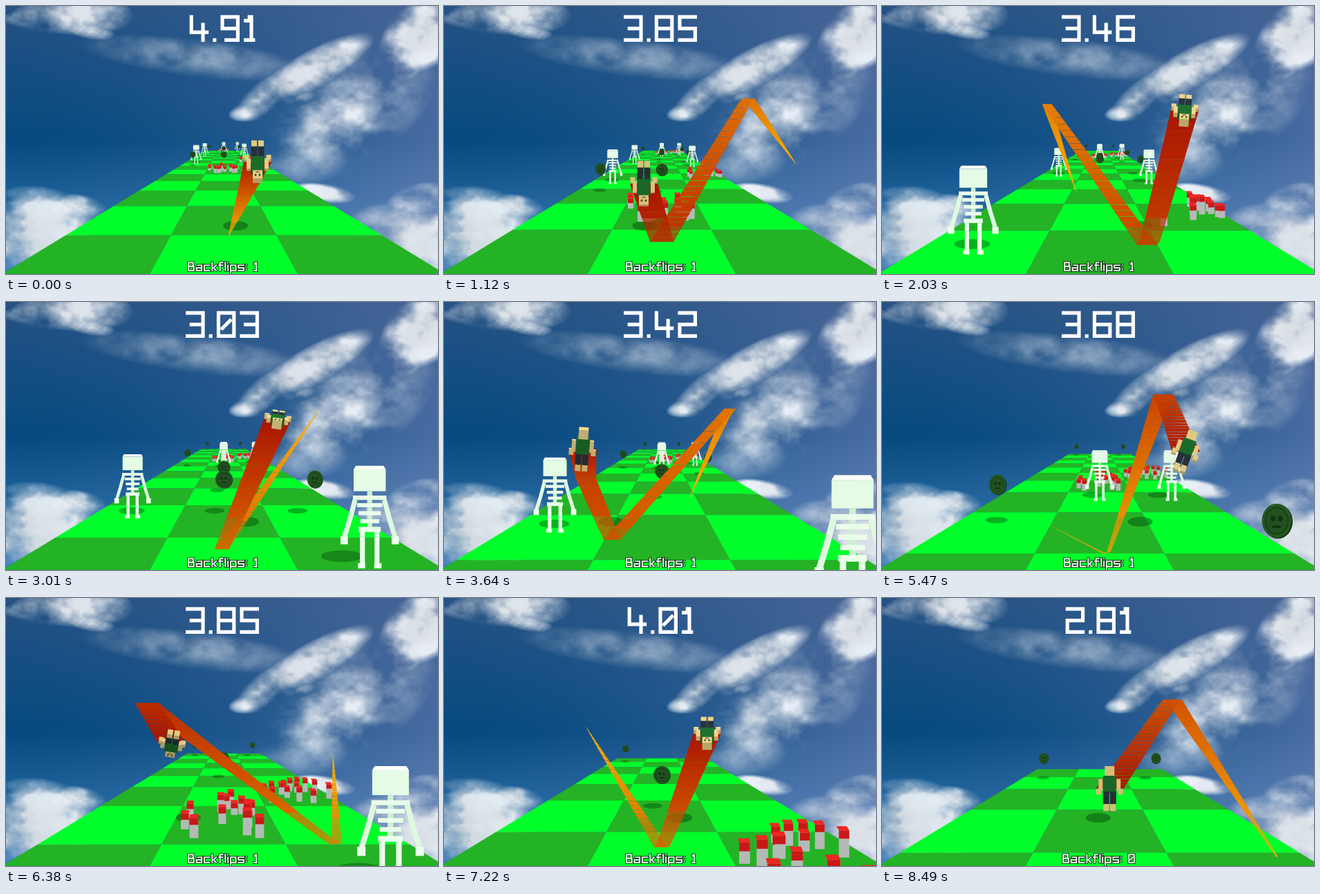
An HTML page with a canvas for the animation above (8.56 s loop, 625 by 389 pixels).

```html
<!DOCTYPE html>
<html lang="en">
<head>
<meta charset="utf-8">
<title>Backflips</title>
<style>
html, body { margin: 0; width: 100%; height: 100%; overflow: hidden; background: #0b4a80; }
canvas { display: block; width: 625px; height: 389px; }
</style>
</head>
<body>
<canvas id="stage" width="625" height="389" role="img" aria-label="Backflips"></canvas>
<script>
const W = 625, H = 389, LOOP = 8560, STEP = 70;
const CX = 315, HORIZON = 193.5, DROP = 320.5, UNIT = 350.6, FAR = 19.4;
const ctx = document.getElementById('stage').getContext('2d');

const clamp = (v, a = 0, b = 1) => Math.min(b, Math.max(a, v));
const mix = (a, b, k) => a + (b - a) * k;
const mixAll = (a, b, k) => a.map((v, i) => mix(v, b[i], k));
const rgb = (c, k = 1) => `rgb(${c.map(v => Math.round(clamp(v * k, 0, 255))).join()})`;

function hash(x, y) {
  const s = Math.sin(x * 127.1 + y * 311.7) * 43758.5453;
  return s - Math.floor(s);
}

// rows of [time, ...values]; linear in between
function track(rows, t) {
  let i = 1;
  while (i < rows.length - 1 && rows[i][0] < t) i++;
  const a = rows[i - 1], b = rows[i];
  return mixAll(a, b, clamp((t - a[0]) / (b[0] - a[0])));
}

// time, distance to road end, score, pitch, roll
const RUN = [
  [0, 26.3, 4.91, 150, 0], [1120, 22.44, 3.85, 530, 0], [3010, 16.16, 3.03, 1185, 8],
  [4270, 15.38, 3.81, 1740, 0], [5470, 11.84, 3.68, 2140, 20],
  [7220, 8.17, 4.01, 2650, 0], [8490, 5.78, 2.79, 2880, 0], [8560, 5.65, 2.72, 2890, 0]
];
// time, x, y
const PATH = [
  [-420, 321, 319], [0, 364, 226], [220, 470, 222], [570, 423, 141], [970, 315, 336],
  [1120, 289, 258], [1400, 250, 150], [1750, 380, 338], [2050, 442, 138], [2530, 312, 339],
  [3010, 393, 170], [3070, 400, 160], [3250, 250, 330], [3370, 213, 252], [4010, 183, 161],
  [4270, 146, 256], [4430, 130, 335], [4530, 225, 280], [4640, 324, 335], [5170, 400, 137],
  [5470, 441, 220], [5780, 455, 336], [6220, 208, 154], [6720, 315, 343], [7220, 382, 193],
  [7300, 400, 160], [7600, 521, 340], [8090, 410, 150], [8490, 325, 283], [8560, 318, 305]
];

// lane, distance from road end, time it vanishes
const SKELETONS = [[-1, 17.5], [-1, 13.5], [1, 14.5], [1, 8.5], [0, 8.5], [0, 9.6, 4700]];
const COINS = [[-1, 18.5], [0, 18.6], [-1, 9.5], [0, 13.5, 3300], [0, 12.5], [1, 13.5, 3300],
  [1, 10.5], [-1, 1.5], [1, 1.5], [0, 5.5]];
const POSTS = [[0, 19.5], [1, 16.5], [0, 7.5], [1, 6.5]].flatMap(([lane, p], g) =>
  Array.from({ length: 15 }, (_, i) => [
    lane + (hash(i, g) - 0.5) * 0.86,
    p + (hash(i + 40, g) - 0.5) * 0.8,
    0.13 + hash(i, g + 9) * 0.09
  ]));

function noise(x, y) {
  const xi = Math.floor(x), yi = Math.floor(y);
  const s = v => v * v * (3 - 2 * v), fx = s(x - xi), fy = s(y - yi);
  return mix(mix(hash(xi, yi), hash(xi + 1, yi), fx), mix(hash(xi, yi + 1), hash(xi + 1, yi + 1), fx), fy);
}
function cloudNoise(x, y) {
  let sum = 0, amp = 0.5;
  for (let i = 0, f = 1 / 55; i < 5; i++, f *= 2.1, amp /= 2) sum += amp * noise(x * f + i * 17, y * f * 1.35 + i * 5);
  return sum;
}

// x, y, radius x, radius y, turn, density
const CLOUDS = [
  [70, 2, 115, 38, 0.12, 1.1], [105, 28, 55, 16, 0.3, 0.7], [275, 75, 170, 28, 0.12, 0.3],
  [432, 100, 115, 30, -0.52, 1.05], [365, 150, 45, 16, -0.2, 0.75], [432, 131, 22, 9, -0.2, 0.9],
  [490, 160, 150, 75, -0.55, 0.48], [602, 42, 75, 48, -0.7, 1.15], [570, 95, 50, 20, -0.5, 0.7],
  [35, 335, 105, 75, 0, 1.35], [100, 292, 45, 20, 0.1, 0.9], [595, 340, 105, 50, 0.25, 1.25],
  [458, 271, 48, 14, 0.15, 0.9], [595, 285, 50, 28, -0.3, 0.7]
].map(([x, y, rx, ry, a, s]) => ({ x, y, rx, ry, s, c: Math.cos(a), n: Math.sin(a) }));

function makeSky() {
  const sky = document.createElement('canvas');
  sky.width = W;
  sky.height = H;
  const g = sky.getContext('2d'), img = g.createImageData(W, H);
  const rows = [[[38, 82, 132], [72, 102, 152]], [[5, 74, 128], [72, 108, 162]], [[62, 126, 186], [108, 142, 192]]];
  for (let y = 0; y < H; y++) {
    const v = y / H * 2, r = v < 1 ? 0 : 1;
    const left = mixAll(rows[r][0], rows[r + 1][0], v - r);
    const right = mixAll(rows[r][1], rows[r + 1][1], v - r);
    for (let x = 0; x < W; x++) {
      let m = 0;
      for (const k of CLOUDS) {
        const dx = x - k.x, dy = y - k.y;
        const u = (dx * k.c + dy * k.n) / k.rx, w = (dy * k.c - dx * k.n) / k.ry;
        m = Math.max(m, k.s * (1 - u * u - w * w));
      }
      const n = cloudNoise(x, y);
      const a = m > 0 ? clamp(m * 0.9 + (n - 0.5) * 2.4 * Math.min(1, m * 2)) * 0.92 : 0;
      const light = 196 + n * 65;
      const h = x / W, i = (y * W + x) * 4;
      for (let c = 0; c < 3; c++) img.data[i + c] = mix(mix(left[c], right[c], h * h * (1.6 - 0.6 * h)), light + c * 3, a);
      img.data[i + 3] = 255;
    }
  }
  g.putImageData(img, 0, 0);
  return sky;
}
const SKY = makeSky();

function poly(points, fill) {
  ctx.fillStyle = fill;
  ctx.beginPath();
  points.forEach(p => ctx.lineTo(p[0], p[1]));
  ctx.closePath();
  ctx.fill();
}
function oval(x, y, rx, ry, fill, turn = 0) {
  ctx.fillStyle = fill;
  ctx.beginPath();
  ctx.ellipse(x, y, rx, ry, turn, 0, Math.PI * 2);
  ctx.fill();
}
const floorPoint = (x, d) => [CX + x * UNIT / d, HORIZON + DROP / d];

function drawRoad(end) {
  for (let k = 0; k < end; k++) {
    const far = Math.min(end - k, FAR), near = Math.max(end - k - 1, 0.8);
    if (near >= far) continue;
    for (let lane = -1; lane <= 1; lane++) {
      poly([floorPoint(lane - 0.5, far), floorPoint(lane + 0.5, far),
        floorPoint(lane + 0.5, near), floorPoint(lane - 0.5, near)],
      (k + lane) % 2 === 0 ? '#00ff2a' : '#24b324');
    }
  }
}

function floorShadow(lane, d, size) {
  const [x, y] = floorPoint(lane - 0.11, d * 1.1);
  oval(x, y, size / d, size * 0.28 / d, 'rgba(0,70,10,.4)');
}

function drawSkeleton(lane, d) {
  const [x, y] = floorPoint(lane, d), s = UNIT / d;
  floorShadow(lane, d, 50);
  const bone = (bx, by, w, h, fill = '#e9ffea') => {
    ctx.fillStyle = fill;
    ctx.fillRect(x + (bx - w / 2) * s, y - (by + h) * s, w * s, h * s);
  };
  const limb = points => {
    ctx.strokeStyle = '#dff8e0';
    ctx.lineWidth = 0.034 * s;
    ctx.beginPath();
    points.forEach(p => ctx.lineTo(x + p[0] * s, y - p[1] * s));
    ctx.stroke();
  };
  bone(0, 0.25, 0.035, 0.28, '#cfeed2');
  for (const side of [-1, 1]) {
    bone(side * 0.05, 0.02, 0.034, 0.24);
    bone(side * 0.056, 0, 0.05, 0.035);
    limb([[side * 0.1, 0.47], [side * 0.135, 0.34], [side * 0.175, 0.21]]);
    bone(side * 0.175, 0.165, 0.05, 0.055);
  }
  bone(0, 0.25, 0.15, 0.035);
  [0.31, 0.365, 0.42].forEach((h, i) => bone(0, h, 0.13 + i * 0.022, 0.028));
  bone(0, 0.47, 0.23, 0.03);
  bone(0, 0.53, 0.22, 0.15, '#e4fbe5');
  poly([[-0.11, 0.68], [-0.095, 0.705], [0.095, 0.705], [0.11, 0.68]].map(p => [x + p[0] * s, y - p[1] * s]), '#fafffa');
}

function drawCoin(lane, d) {
  floorShadow(lane, d, 38);
  const x = CX + lane * UNIT / d, y = HORIZON + DROP * 0.53 / d, r = 34 / d;
  const rx = r * (lane ? 0.86 : 0.95);
  oval(x + r * 0.07, y + r * 0.05, rx, r, '#102f12');
  oval(x, y, rx, r, '#24581f');
  oval(x, y, rx * 0.82, r * 0.82, '#173f18');
  oval(x, y, rx * 0.74, r * 0.74, '#23501f');
  for (const side of [-1, 1]) oval(x + side * rx * 0.25, y - r * 0.12, rx * 0.16, r * 0.16, '#123313');
  ctx.fillStyle = '#123313';
  ctx.fillRect(x - rx * 0.3, y + r * 0.28, rx * 0.6, r * 0.14);
}

function drawPost(px, d, tall) {
  const [x, y] = floorPoint(px, d), s = UNIT / d;
  const w = 0.075 * s, h = tall * s, cap = 0.06 * s, lean = -Math.sign(px) * 0.014 * s * Math.abs(px);
  ctx.fillStyle = '#b4bab6';
  ctx.fillRect(x - w / 2, y - h, w, h);
  ctx.fillStyle = '#c91818';
  ctx.fillRect(x - w / 2, y - h, w, cap);
  poly([[x - w / 2, y - h], [x + w / 2, y - h], [x + w / 2 + lean, y - h - w * 0.4], [x - w / 2 + lean, y - h - w * 0.4]], '#ee2622');
}

// centre, size, colour; -z is the chest side
const SKIN = [238, 212, 136], SHIRT = [30, 112, 44], TROUSERS = [40, 52, 60];
const BODY = [
  [0, 25, 0, 14, 14, 13, SKIN], [0, 6, 0, 19, 24, 11, SHIRT],
  ...[-1, 1].flatMap(s => [
    [s * 5, -14, 0, 9, 18, 9, TROUSERS], [s * 5, -28, 0, 8, 10, 9, SKIN],
    [s * 13, 5, 0, 6, 17, 7, SKIN], [s * 16, -5, -1, 7, 8, 7, SKIN],
    [s * 3, 26, -6.6, 2.6, 2.6, 1, [36, 84, 50]]
  ]),
  [0, 21, -6.6, 5, 1.5, 1, [150, 96, 60]]
];
const FACES = [[0, 1], [0, -1], [1, 1], [1, -1], [2, 1], [2, -1]];

function drawPlayer(x, y, pitch, roll) {
  const a = pitch * Math.PI / 180, b = roll * Math.PI / 180;
  const turn = ([px, py, pz]) => {
    const qy = py * Math.cos(a) - pz * Math.sin(a), qz = py * Math.sin(a) + pz * Math.cos(a);
    return [px * Math.cos(b) + qy * Math.sin(b), qy * Math.cos(b) - px * Math.sin(b), qz];
  };
  const parts = BODY.map(p => ({ c: p.slice(0, 3), s: p.slice(3, 6), col: p[6], z: turn(p.slice(0, 3))[2] }));
  parts.sort((p, q) => p.z - q.z);
  for (const { c, s, col } of parts) {
    for (const [axis, sign] of FACES) {
      const n = [0, 0, 0];
      n[axis] = sign;
      const dir = turn(n);
      if (dir[2] <= 0.01) continue;
      const u = (axis + 1) % 3, v = (axis + 2) % 3;
      const corners = [[-1, -1], [1, -1], [1, 1], [-1, 1]].map(([i, j]) => {
        const p = c.slice();
        p[axis] += sign * s[axis] / 2;
        p[u] += i * s[u] / 2;
        p[v] += j * s[v] / 2;
        const q = turn(p);
        return [x + q[0], y - q[1]];
      });
      poly(corners, rgb(col, 0.88 + dir[1] * 0.16 + dir[0] * 0.06));
    }
  }
}

function drawTrail(t) {
  const life = Math.min(900, t + 420), N = 60;
  const point = i => {
    const age = life * i / N, [, px, py] = track(PATH, t - age);
    const grow = 1 + age * 0.00028;
    return [CX + (px - CX) * grow, HORIZON + (py - HORIZON) * grow, 20 * Math.pow(1 - i / N, 0.9)];
  };
  for (let i = N; i > 0; i--) {
    const a = point(i), b = point(i - 1), k = i / N;
    const col = k < 0.5 ? mixAll([168, 18, 0], [214, 92, 0], k * 2) : mixAll([214, 92, 0], [250, 178, 8], k * 2 - 1);
    ctx.globalAlpha = a[1] > 315 ? 0.75 : 1;
    poly([[a[0] - a[2], a[1] + 0.4], [a[0] + a[2] + 0.4, a[1] + 0.4], [b[0] + b[2] + 0.4, b[1]], [b[0] - b[2], b[1]]], rgb(col));
  }
  ctx.globalAlpha = 1;
}

// stroke glyphs on a 7-row grid: [width, path]
const GLYPHS = {
  0: [5, 'M0 0H4V6H0ZM1 4L3 2'], 1: [3, 'M0 1H1V0M1.5 0V6M0 6H2'], 2: [5, 'M0 0H4V3H0V6H4'],
  3: [5, 'M0 0H4V6H0M1 3H4'], 4: [5, 'M0 0V4H4M3 2V6'], 5: [5, 'M4 0H0V3H4V6H0'],
  6: [5, 'M4 0H0V6H4V3H0'], 7: [5, 'M0 0H4V2L2 4V6'], 8: [5, 'M0 0H4V6H0ZM0 3H4'],
  9: [5, 'M4 3H0V0H4V6H1'], '.': [1, 'M0 6V6.01'], ':': [1, 'M0 2V2.01M0 5V5.01'], ' ': [3, ''],
  B: [5, 'M0 0H3.5V2.7H0V0V6H4V3H0'], a: [5, 'M1 2H4V6H0V4H4'], c: [5, 'M4 2H0V6H4'],
  k: [4, 'M0 0V6M0 4H1L3 2M1 4L3 6'], f: [4, 'M3 0H1V6M0 2H3'], l: [1, 'M0 0V6'],
  i: [1, 'M0 0V.01M0 2V6'], p: [5, 'M0 8V2H4V6H0'], s: [5, 'M4 2H0V4H4V6H0']
};
for (const k in GLYPHS) GLYPHS[k][1] = new Path2D(GLYPHS[k][1]);

function drawText(text, mid, top, cell, outline) {
  const chars = [...text];
  const width = chars.reduce((sum, ch) => sum + GLYPHS[ch][0] + 1, -1);
  const pass = (color, line) => {
    let x = mid - width * cell / 2;
    ctx.strokeStyle = color;
    ctx.lineWidth = line;
    for (const ch of chars) {
      ctx.save();
      ctx.translate(x + cell / 2, top + cell / 2);
      ctx.scale(cell, cell);
      ctx.stroke(GLYPHS[ch][1]);
      ctx.restore();
      x += (GLYPHS[ch][0] + 1) * cell;
    }
  };
  ctx.lineCap = 'square';
  ctx.lineJoin = 'miter';
  if (outline) pass('rgba(20,40,20,.85)', 2);
  pass('#fff', outline ? 0.9 : 0.92);
  ctx.lineCap = 'butt';
}

function draw(t) {
  const [, end, score, pitch, roll] = track(RUN, t);
  const [, x, y] = track(PATH, t);
  ctx.drawImage(SKY, 0, 0);
  drawRoad(end);
  oval(CX + (x - CX) * 0.55 - 10, 319, 18, 7, 'rgba(0,70,10,.45)');

  const scene = [{ d: 2.1, paint() { drawTrail(t); drawPlayer(x, y, pitch, roll); } }];
  const add = (list, near, paint) => {
    for (const [lane, p, extra] of list) {
      const d = end - p, gone = paint !== drawPost && extra <= t;
      if (d > (lane === 0 ? near : 0.7) && d < FAR && !gone) scene.push({ d, paint: () => paint(lane, d, extra) });
    }
  };
  add(SKELETONS, 1.6, drawSkeleton);
  add(COINS, 2.1, drawCoin);
  add(POSTS, 0.7, drawPost);
  scene.sort((p, q) => q.d - p.d).forEach(o => o.paint());

  drawText(score.toFixed(2), 313, 13, 5.6, false);
  drawText('Backflips: ' + (t < 7600 ? 1 : 0), 313.5, 371.5, 1.9, true);
}

const start = performance.now();
function tick() {
  const t = (performance.now() - start) % LOOP;
  draw(Math.floor(t / STEP) * STEP);
  requestAnimationFrame(tick);
}
tick();
</script>
</body>
</html>
```
